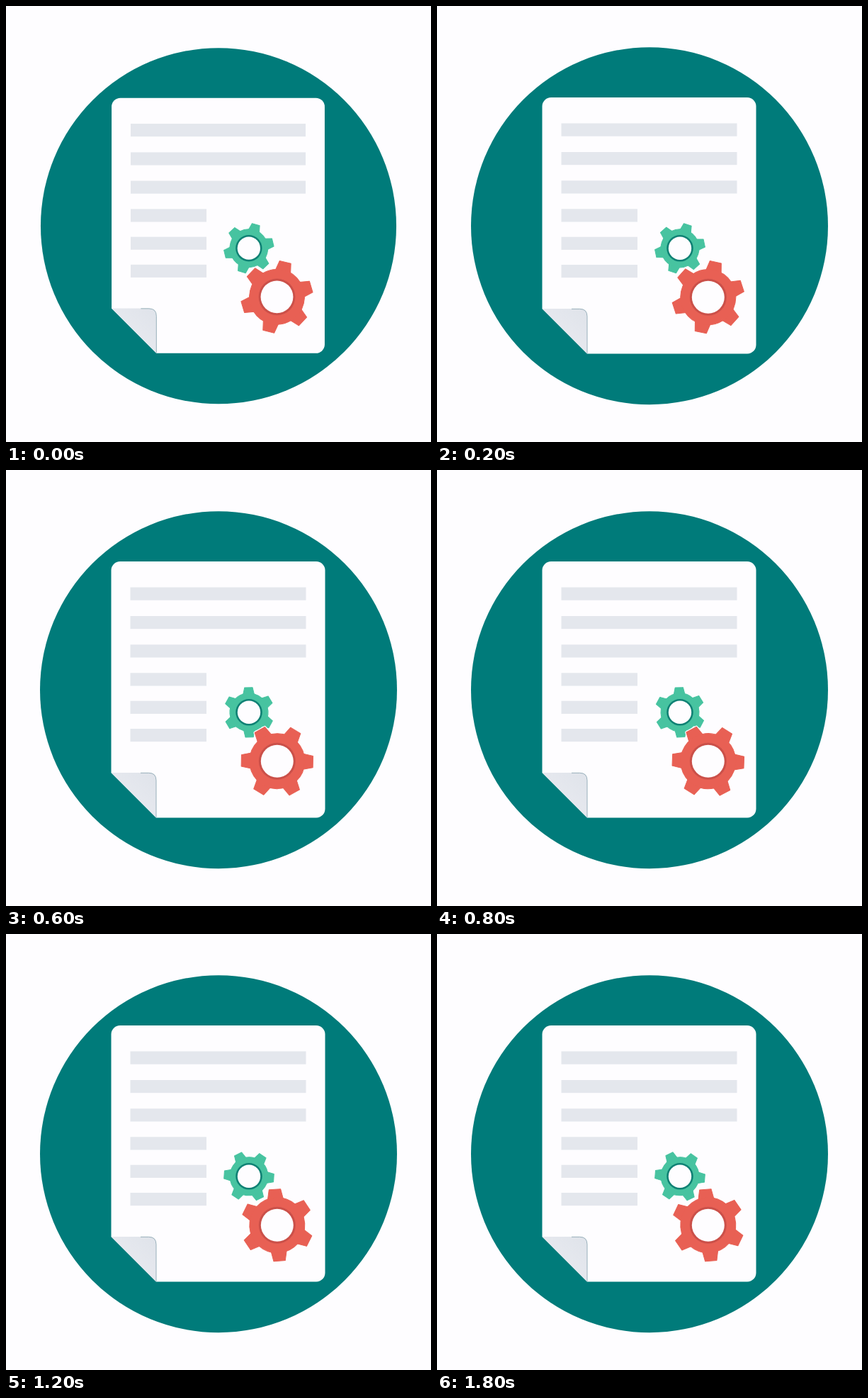
Animation, 600 px wide and 615 px high, one loop 1900 ms. Source, as an HTML page:

```html
<!DOCTYPE html>
<html lang="en">
<head>
<meta charset="utf-8">
<title>Document with gears</title>
<style>
  html, body { margin: 0; width: 100%; height: 100%; overflow: hidden; background: #fefdff; }
  svg { display: block; width: 100%; height: 100%; }
</style>
</head>
<body>
<svg viewBox="0 0 600 615">
  <defs>
    <linearGradient id="curl" x1="0" y1="1" x2="1" y2="0">
      <stop offset="0.4" stop-color="#e7e9ef"/>
      <stop offset="1" stop-color="#dfe3ea"/>
    </linearGradient>
  </defs>
  <g id="scene">
    <circle cx="300" cy="310.2" r="252" fill="#007b7a"/>
    <path fill="#fefdff" d="M148.5 427V141.500a12.500 12.500 0 0 1 12.500-12.500H438a12.500 12.500 0 0 1 12.500 12.500V478a12.500 12.500 0 0 1-12.500 12.500H212Z"/>
    <path fill="url(#curl)" d="M148.500 427H201.500q10.500 0 10.500 10.500V490.500Z"/>
    <path fill="none" stroke="#8fa9b5" stroke-width="0.9" d="M190 427.300H201.500q10.500 0 10.500 10.500V490"/>
    <g id="bars" fill="#e4e7ed"></g>
    <g id="small"></g>
    <g id="large"></g>
  </g>
</svg>
<script>
const LOOP = 1900, STEP = 100;
const $ = id => document.getElementById(id);

function add(parent, tag, attrs) {
  const el = document.createElementNS('http://www.w3.org/2000/svg', tag);
  for (const k in attrs) el.setAttribute(k, attrs[k]);
  parent.appendChild(el);
  return el;
}

[165.5, 206, 246.3, 286.3, 325.7, 365].forEach((y, i) =>
  add($('bars'), 'rect', { x: 175.5, y, width: i < 3 ? 248 : 107.5, height: 18.2 }));

// Round body with six tapered teeth; the hub stays still.
function gear(id, x, y, g) {
  const root = $(id);
  root.setAttribute('transform', `translate(${x} ${y})`);
  const wheel = add(root, 'g', {});
  const tooth = `M${-g.base} ${-g.body + 3}L${-g.top} ${-g.tip}H${g.top}L${g.base} ${-g.body + 3}Z`;
  const layer = (color, width) => {
    const style = { fill: color, stroke: color, 'stroke-width': width, 'stroke-linejoin': 'round' };
    for (let i = 0; i < 6; i++) add(wheel, 'path', { d: tooth, transform: `rotate(${i * 60})`, ...style });
    add(wheel, 'circle', { r: g.body - 0.5, ...style });
  };
  if (g.rim) layer('#fefdff', 3.4);
  layer(g.color, 1);
  add(root, 'circle', { r: g.ring, fill: g.shade });
  add(root, 'circle', { r: g.hole, fill: '#fefdff' });
  return angle => wheel.setAttribute('transform', `rotate(${angle})`);
}

const turnSmall = gear('small', 343, 341.8, {
  body: 27.5, tip: 35, top: 5.6, base: 8, ring: 18.8, hole: 16.2,
  color: '#47c3a0', shade: '#0f8174'
});
const turnLarge = gear('large', 382.8, 410.7, {
  body: 39.5, tip: 50.5, top: 8.2, base: 11, ring: 26, hole: 23,
  color: '#e86054', shade: '#cb5049', rim: true
});

// Large wheel: time in ms, angle in degrees, speed in degrees per ms
const keys = [
  [0, 13.5, 0],
  [200, 12, -0.02],
  [400, -29.5, -0.28],
  [600, -89, -0.3],
  [1000, -180, -0.03],
  [1400, -184.5, 0]
];

function angleAt(t) {
  const i = keys.findIndex(k => k[0] > t);
  if (i < 0) return keys[keys.length - 1][1];
  const [t0, a0, v0] = keys[i - 1], [t1, a1, v1] = keys[i];
  const d = t1 - t0, u = (t - t0) / d, w = 1 - u;
  return a0 * w * w * (1 + 2 * u) + a1 * u * u * (3 - 2 * u)
       + d * u * w * (v0 * w - v1 * u);
}

function draw(now) {
  const t = Math.floor((now % LOOP) / STEP) * STEP;
  const angle = angleAt(t);
  turnLarge(angle);
  turnSmall(30 - angle);
  const s = t < STEP ? 0.9962 : 1;
  $('scene').setAttribute('transform', `translate(300 310.2) scale(${s}) translate(-300 -310.2)`);
}

let start;
function tick(now) {
  start ??= now;
  draw(now - start);
  requestAnimationFrame(tick);
}
draw(0);
requestAnimationFrame(tick);
</script>
</body>
</html>
```
